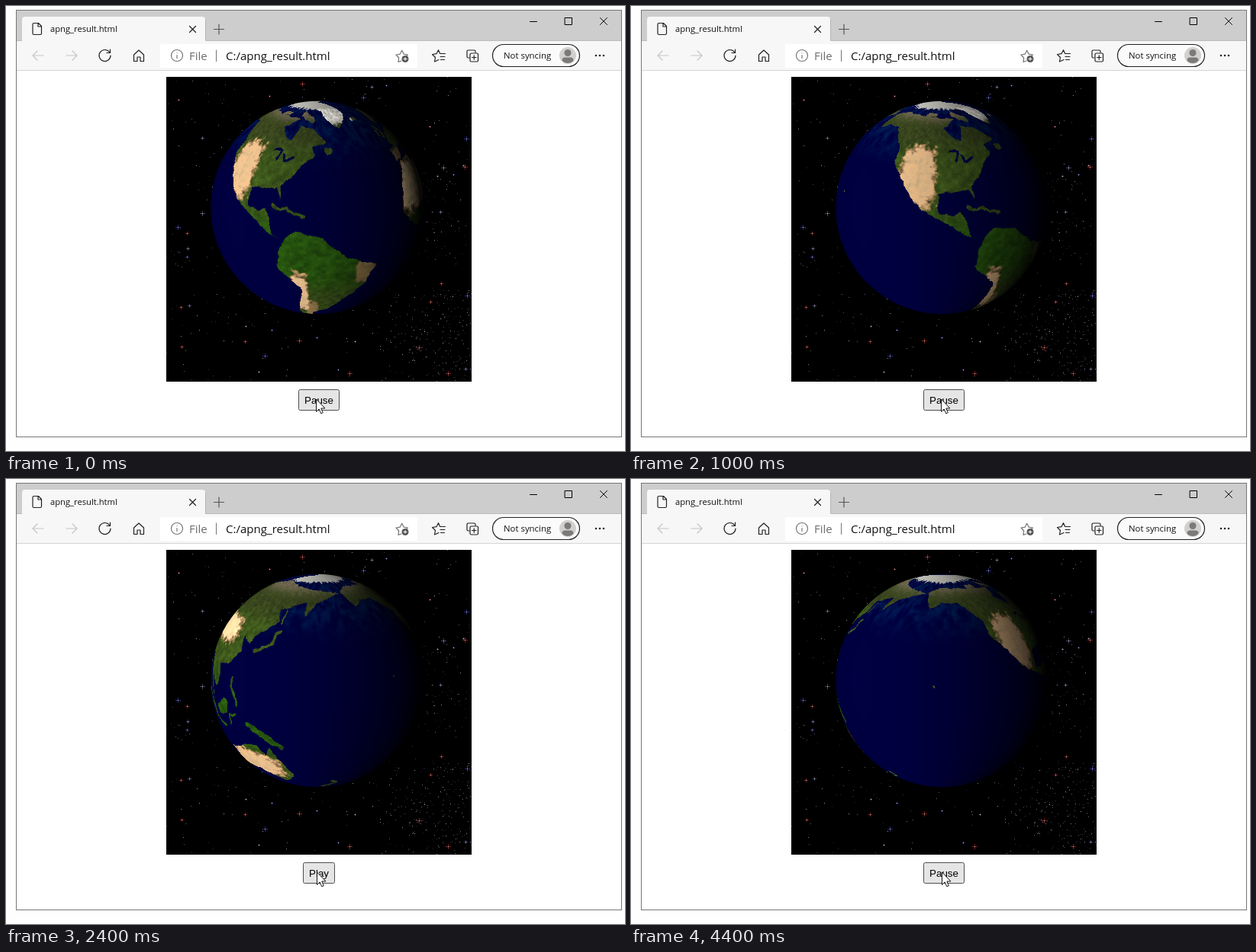
These frames come from a looping animation (811x584 px, 4.5 s). An HTML page with a canvas:

```html
<!DOCTYPE html>
<html lang="en">
<head>
<meta charset="utf-8">
<title>Spinning globe</title>
<style>
html, body { margin: 0; width: 100%; height: 100%; overflow: hidden; background: #fefefe; }
svg, canvas { position: absolute; left: 0; top: 0; display: block; }
canvas { left: 210px; top: 93px; }
text { font-family: "Open Sans", "Noto Sans", sans-serif; fill: #111; }
.btn text { font: 13.333px "Liberation Sans", Arial, sans-serif; fill: #000; text-anchor: middle; }
.ico { fill: none; stroke: #222; stroke-width: 1.2; stroke-linejoin: round; stroke-linecap: round; }
.dim { stroke: #c6c6c6; }
.grey { stroke: #757575; }
</style>
</head>
<body>
<svg width="811" height="584" viewBox="0 0 811 584">
  <rect x="13.5" y="5.5" width="793" height="560" fill="#fff" stroke="#777"/>
  <rect x="14" y="6" width="792" height="40" fill="#cdcdcd"/>
  <path d="M14 46h792v38H14z" fill="#f7f7f7"/>
  <path d="M14 45.5h7M262 45.5h544" stroke="#bcbcbc"/>
  <path d="M21 46V18q0-4 4-4H257q4 0 4 4V46z" fill="#f7f7f7"/>
  <path d="M261.5 18V45" stroke="#b4b4b4"/>
  <path d="M14 84.5h792" stroke="#d4d4d4"/>
  <rect x="202" y="50" width="337" height="31" rx="2" fill="#fff"/>

  <g class="ico">
    <path d="M36.5 22.5h6l4 4v9.5q0 1.5-1.5 1.5h-8.5q-1.5 0-1.5-1.5V24q0-1.500 1.500-1.500zM42 22.500v4.500h4.500"/>
    <path d="M240.5 26.5l8 8m0-8l-8 8"/>
    <path d="M272.5 30.5h13M279 24v13" stroke="#555"/>
    <path d="M686.5 20.5h9M732.5 15.5h9v9h-9zM778.5 15.5l9 9m0-9l-9 9" stroke="#000" stroke-width="1"/>
    <path class="dim" d="M49 65H35m6-6l-6 6l6 6"/>
    <path class="dim" d="M79 65H93m-6-6l6 6l-6 6"/>
    <path d="M135.5 60.5A7.5 7.5 0 1 0 137 65M136.5 57v4.5h-4.5"/>
    <path d="M167.5 64l6.5-6l6.5 6v8.5h-4.5v-5.5h-4v5.5h-4.5z"/>
    <circle class="grey" cx="224" cy="65" r="7.5"/>
    <path class="grey" d="M224 64.5v4M224 61.5v.1"/>
    <path class="grey" d="M275.5 58v14.5" stroke-width="1"/>
    <path class="grey" d="M518 72l-4 1.5l.7-5.5l-3.7-4l5.2-.8l2.5-5l2.5 5l5.2 .8l-2 2"/>
    <path d="M567 70.5l-5.5 2.5l1-5.5l-4-4l5.5-.8l2.5-5l2.2 4.8M569 62.5h6.500M569 66.500h6M569.500 70.500h5"/>
    <path d="M607 68h-1.500q-1.500 0-1.500-1.500v-7q0-1.500 1.500-1.500h8q1.500 0 1.500 1.500v1.500"/>
    <rect x="608" y="62" width="10.5" height="11" rx="1.5"/>
    <path d="M610.5 67.5h5.5M613.25 64.8v5.4"/>
    <rect x="637.5" y="50.5" width="114" height="29" rx="14.5" fill="#fbfbfb"/>
  </g>
  <circle cx="523" cy="69.5" r="4.5" fill="#555"/>
  <path d="M520.5 69.5h5M523 67v5" stroke="#fff"/>
  <circle cx="736" cy="65" r="11" fill="#d2d0ce"/>
  <circle cx="736" cy="61.5" r="4.5" fill="#7c7a78"/>
  <path d="M728.5 71.5q0-4 4-4h7q4 0 4 4q-3 3.5-7.5 3.5t-7.5-3.5z" fill="#7c7a78"/>
  <path d="M773 65h.01m4.990 0h.01m4.990 0h.01" stroke="#222" stroke-width="2.600" stroke-linecap="round"/>

  <text x="58" y="34" font-size="11.2">apng_result.html</text>
  <text x="240" y="71" font-size="15" style="fill:#6c6c6c">File</text>
  <text x="288" y="71" font-size="15">C:/apng_result.html</text>
  <text x="652" y="69" font-size="11.4">Not syncing</text>

  <g class="btn">
    <rect id="face" y="503.5" height="27" rx="2"/>
    <text id="label" x="410" y="522"></text>
  </g>
  <path id="cursor" d="M0 0V16.5L3.7 13L6.2 18.8L8.8 17.7L6.3 12H11.5Z" fill="#fff" stroke="#000" stroke-width=".9"/>
</svg>
<canvas id="sky" width="400" height="400"></canvas>

<script>
const $ = id => document.getElementById(id);
const RAD = Math.PI / 180;
const clamp = (v, a, b) => Math.min(b, Math.max(a, v));
const mix = (a, b, k) => a.map((v, i) => v + (b[i] - v) * k);
const smooth = (a, b, v) => {
  const k = clamp((v - a) / (b - a), 0, 1);
  return k * k * (3 - 2 * k);
};

function random(seed) {
  return () => {
    seed = (seed + 0x6D2B79F5) | 0;
    let n = Math.imul(seed ^ seed >>> 15, seed | 1);
    n ^= n + Math.imul(n ^ n >>> 7, n | 61);
    return ((n ^ n >>> 14) >>> 0) / 4294967296;
  };
}

// Smooth noise, about -1 to 1.
const rnd = random(11);
const lattice = Float32Array.from({ length: 65536 }, () => rnd() * 2 - 1);

function noise(x, y) {
  const ix = Math.floor(x), iy = Math.floor(y);
  const fx = x - ix, fy = y - iy;
  const at = (i, j) => lattice[(iy + j & 255) << 8 | ix + i & 255];
  const top = at(0, 0) + (at(1, 0) - at(0, 0)) * fx;
  const low = at(0, 1) + (at(1, 1) - at(0, 1)) * fx;
  return top + (low - top) * fy;
}
const rough = (x, y) => .6 * noise(x, y) + .3 * noise(x * 2.1, y * 2.1) + .15 * noise(x * 4.3, y * 4.3);

// Key points of the coasts as "lon lat" pairs; noise adds the detail.
const shores = [
  `-168 66 -156 71 -128 70 -95 68 -82 68 -94 60 -82 52 -78 62 -65 60 -56 52 -66 50 -64 46 -70 42 -76 35 -81 31 -80 25
   -83 30 -97 28 -97 20 -91 18.5 -87 21 -84 15 -83 10 -78 8 -86 11 -95 16 -106 22 -115 32 -124 41 -124 48 -138 59 -150 60 -162 55`,
  '-72 78 -35 83 -20 78 -24 70 -43 60 -52 66 -57 75',
  '-77 8 -72 12 -61 10 -50 0 -35 -6 -39 -16 -48 -26 -57 -36 -65 -42 -68 -54 -74 -50 -73 -37 -70 -18 -81 -5 -80 1',
  `-6 36 10 37 11 33.5 19 30.5 22 33 32 31 37 20 43 12 51 12 40 -4 40 -15 35 -20 32 -28 26 -34 19 -34.5
   12 -17 13 -8 9 0 9 4.5 -8 4.5 -17.500 14 -16 22 -10 31`,
  `50 68 40 65 41 68 26 71 12 65 5 60 11 58 17 60 24 66 22 60 30 60 20 54.5 9 54.5 2 51 -4 48 -1 44 -9 43 -9 37 -2 37
   3 43 9 44 16 38 18 40 13 45 20 42 22 37 24 40 29 41 29 45 39 47 42 42 51 41`,
  `27 40 28 37 36 36.500 48 31 57 27 67 25 73 20 77 8 80 15 90 22 95 16 99 9 104 1.500 100 13 105 9 109 13 107 21 115 23
   122 30 119 38 126 35 128 39 140 48 137 54 156 60 157 51 165 60 190 66 140 72 104 77 68 69 49 69 40 47 42 41.500`,
  '34 32 35 28 43 13 52 16 60 23 55 25 48 30 42 37 36 37',
  '114 -22 116 -34 124 -33 131 -31.5 138 -35 146 -39 153 -30 149 -20.5 145.5 -16 142.5 -11 140 -17.5 136 -12 130 -13 122 -18'
];

// Island chains: width in degrees, path.
const chains = [
  [1.6, '131 32 135 34.5 140 36.5 141 41 143 43'], [1.4, '142 47 142.5 54'], [1.4, '121 18 121 14 125 9 125 6'],
  [2.6, '96 4.5 105 -5'], [1.5, '106 -7 115 -8'], [6, '112 0 116 3.5'], [1.4, '120 -5 120 0 124 1'],
  [3, '132 -2 140 -5 149 -10'], [2, '174 -36 177 -39 173 -42 167 -46'], [4, '45.500 -23 48.500 -15'],
  [1.3, '-84 22 -76 20.500 -69 18.700'], [2.6, '-4 51 -1 52.500 -4 57'], [2.6, '-8 53 -7.500 54'],
  [2.2, '-22 65 -15 65'], [.8, '-156 20 -155.300 19.500'], [3, '-57 48 -54 48'], [5, '-82 72 -68 67'], [4, '-115 71 -104 71']
];
const lakes = [[1.4, '-91 47.500 -85 47 -87 43'], [1.2, '-83 45 -82 42 -77 43.500'], [3.4, '50 45 51 38'], [1.5, '33 0 33 -1']];

// Dry regions: lon, lat, half width, half height, paleness.
const deserts = [
  [9, 24.5, 31, 12, 1], [47, 23, 15, 12, .87], [62, 35, 20, 10, .7], [93, 38, 19, 7, .84], [-109, 36, 10, 14, .74],
  [-71, -23, 4, 15, .77], [-66, -38, 4, 12, .45], [20, -27, 8, 9, .68], [46, 6, 6, 8, .66], [130, -26, 17, 9, .74],
  [-40, -9, 5, 7, .42], [75, 20, 5, 10, .5], [-4, 40, 5, 3, .52], [33, -8, 9, 12, .32]
];

const W = 1440, H = 720, PPD = 4; // texture size, pixels per degree

function drawMask() {
  const c = document.createElement('canvas');
  c.width = W;
  c.height = H;
  const g = c.getContext('2d', { willReadFrequently: true });
  g.lineCap = g.lineJoin = 'round';
  const trace = (pts, width) => {
    const n = pts.trim().split(/\s+/).map(Number);
    for (const turn of [0, -360]) {
      g.setTransform(PPD, 0, 0, -PPD, W / 2 + turn * PPD, H / 2);
      g.beginPath();
      for (let i = 0; i < n.length; i += 2) g.lineTo(n[i], n[i + 1]);
      g.lineWidth = width;
      width ? g.stroke() : g.fill();
    }
  };
  shores.forEach(s => trace(s, 0));
  chains.forEach(([w, s]) => trace(s, w));
  g.globalCompositeOperation = 'destination-out';
  lakes.forEach(([w, s]) => trace(s, w));
  return g.getImageData(0, 0, W, H).data;
}

const dryRamp = [[58, 82, 26], [128, 108, 62], [192, 152, 110], [325, 285, 215]];

function landColour(lon, lat, grain) {
  const ice = lon > -62 && lon < -20 ? smooth(61, 66, lat + grain * 4) : 0;
  let dry = 0;
  for (const [x, y, rx, ry, level] of deserts) {
    const dx = (lon - x) / rx, dy = (lat - y) / ry;
    if (Math.abs(dx) > 2 || Math.abs(dy) > 2) continue;
    const d = Math.pow(dx ** 4 + dy ** 4, .25) + grain * .3;
    dry = Math.max(dry, level * smooth(1.2, .78, d));
  }
  let c = mix([38, 82, 14], dryRamp[0], smooth(8, 24, Math.abs(lat)));
  c = mix(c, [54, 66, 28], smooth(42, 56, lat));
  c = mix(c, [112, 104, 80], smooth(61, 72, lat + grain * 8));
  if (dry > 0) {
    const k = clamp((dry + grain * .12) * 3, 0, 2.999), i = k | 0;
    c = mix(mix(dryRamp[i], dryRamp[i + 1], k - i), c, 1 - smooth(0, .3, dry));
  }
  c = mix(c, [250, 248, 238], ice);
  return c.map(v => v * (1.1 - grain * .35));
}

function buildTexture() {
  const mask = drawMask(), map = new Float32Array(W * H * 3);
  for (let py = 0; py < H; py++) for (let px = 0; px < W; px++) {
    const lon = px / PPD - 180, lat = 90 - py / PPD;
    const wx = rough(lon * .3, lat * .3), wy = rough(lon * .3 + 90, lat * .3 + 40);
    const sx = (px + Math.round(wx * 5) + W) % W;
    const sy = clamp(py + Math.round(wy * 5), 0, H - 1);
    const cover = mask[(sy * W + sx) * 4 + 3] / 255;
    let c = [0, 0, 66];
    if (lat > 35) c = mix(c, [0, 34, 92], smooth(36, 55, lat) * clamp(.35 + wx, 0, 1));
    if (cover) c = mix(c, landColour(lon, lat, rough(lon * .5, lat * .6)), cover);
    if (lat > 70 && (lon > 95 || lon < -20)) c = mix(c, [215, 215, 206], smooth(76, 78, lat + wy * 3));
    map.set(c, (py * W + px) * 3);
  }
  return map;
}

function drawStars(g) {
  const rnd = random(5);
  g.fillStyle = '#000';
  g.fillRect(0, 0, 400, 400);
  const speck = (x, y) => {
    const v = 30 + 130 * rnd() ** 2;
    g.fillStyle = `rgb(${v},${v},${v + 15})`;
    g.fillRect(x | 0, y | 0, 1, 1);
  };
  for (let i = 0; i < 330; i++) speck(rnd() * 400, rnd() * 400);
  for (let i = 0; i < 220; i++) speck(250 + 150 * Math.sqrt(rnd()), 400 - 120 * rnd());
  for (let i = 0; i < 80; i++) speck(320 + rnd() * 75, 120 + rnd() * 120);

  const tints = ['255,70,60', '90,90,255', '150,150,210'];
  for (let i = 0; i < 60; i++) {
    const x = rnd() * 400 | 0, y = rnd() * 400 | 0, arm = 1 + rnd() * 2.500 | 0;
    g.fillStyle = `rgba(${tints[i % 3]},.45)`;
    g.fillRect(x - arm, y, arm * 2 + 1, 1);
    g.fillRect(x, y - arm, 1, arm * 2 + 1);
    g.fillStyle = '#bbb';
    g.fillRect(x, y, 1, 1);
  }
}

// Perspective globe: each pixel keeps its texture row, longitude and light.
const R = 139.7, CX = 198, CY = 171.5, DIST = 4, TILT = 22.5 * RAD;

function buildSphere() {
  const cells = [], k = Math.sqrt(DIST * DIST - 1);
  const ct = Math.cos(TILT), st = Math.sin(TILT);
  for (let py = 30; py < 313; py++) for (let px = 56; px < 340; px++) {
    const u = (px + .5 - CX) / R, v = (CY - py - .5) / R, rr = u * u + v * v;
    const edge = Math.min(1, (1 - Math.sqrt(rr)) * R + .5);
    if (edge <= 0) continue;
    const a = u / k, b = v / k;
    const w = (DIST - Math.sqrt(Math.max(0, 1 - rr))) / (1 + a * a + b * b);
    const x = a * w, y = b * w, z = DIST - w;
    const lat = Math.asin(clamp(y * ct + z * st, -1, 1)) / RAD;
    const lon = Math.atan2(x, z * ct - y * st) / RAD;
    const sun = (-.65 * x + .76 * z) / Math.pow(x * x + z * z + .001, .42);
    const light = Math.max(.03, .2 + .8 * sun);
    const row = Math.min(H - 1, (90 - lat) * PPD | 0) * W;
    cells.push({ at: (py * 400 + px) * 4, row, lon, light, edge });
  }
  return cells;
}

const ctx = $('sky').getContext('2d', { willReadFrequently: true });
drawStars(ctx);
const texture = buildTexture(), sphere = buildSphere();
const image = ctx.getImageData(0, 0, 400, 400), sky = image.data.slice();

function drawGlobe(centre) {
  const out = image.data;
  for (const { at, row, lon, light, edge } of sphere) {
    const turn = ((lon + centre + 180) % 360 + 360) % 360;
    const i = (row + Math.min(W - 1, turn * PPD | 0)) * 3;
    for (let ch = 0; ch < 3; ch++) {
      out[at + ch] = Math.min(255, texture[i + ch] * light) * edge + sky[at + ch] * (1 - edge);
    }
  }
  ctx.putImageData(image, 0, 0);
}

// Time in ms, longitude facing the viewer.
const spin = [
  [0, -62.5], [700, -332], [1300, -578.5], [1800, -806.5], [2000, -914.5],
  [3500, -914.5], [3600, -925], [4000, -1075.5], [4400, -1231.8]
];

function longitude(t) {
  const i = Math.max(1, spin.findIndex(s => s[0] >= t));
  const [t0, a] = spin[i - 1], [t1, b] = spin[i];
  return a + (b - a) * (t - t0) / (t1 - t0);
}

function drawButton(t) {
  const paused = t >= 2000 && t < 3600;
  const pressed = t === 1900 || t === 3500;
  const width = paused ? 41 : 53;
  const set = (id, attrs) => Object.entries(attrs).forEach(([k, v]) => $(id).setAttribute(k, v));
  $('label').textContent = paused ? 'Play' : 'Pause';
  set('face', {
    x: 410 - width / 2, width,
    fill: pressed ? '#f5f5f5' : '#e5e5e5',
    stroke: pressed ? '#8a8a8a' : '#4f4f4f'
  });
  set('cursor', { transform: `translate(${t < 2400 ? 406.5 : 407.5} 516)` });
}

const LOOP = 4500, STEP = 100;
const start = performance.now();
let shown = -1;
function tick() {
  const t = Math.floor((performance.now() - start) % LOOP / STEP) * STEP;
  if (t !== shown) {
    shown = t;
    drawGlobe(longitude(t));
    drawButton(t);
  }
  requestAnimationFrame(tick);
}
tick();
</script>
</body>
</html>
```
